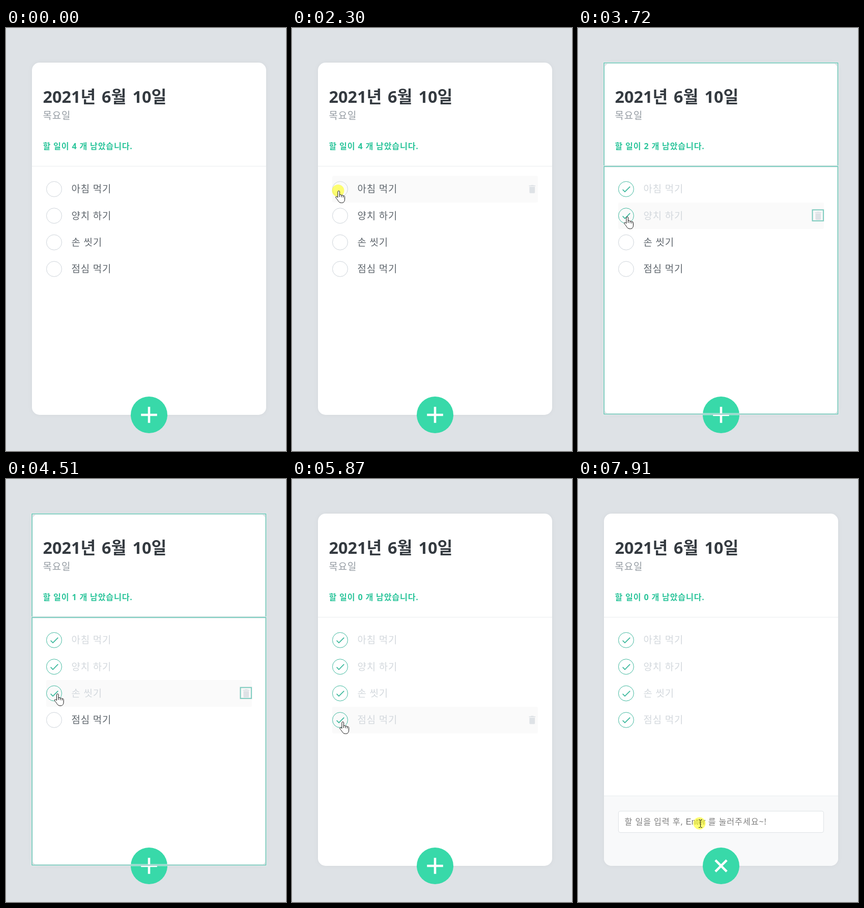
Recreate the animation shown at these times as an HTML page. Size 550 by 831 pixels, loop 8 s.

```html
<!DOCTYPE html>
<html lang="ko">
<head>
<meta charset="utf-8">
<title>할 일 목록</title>
<style>
  html, body { margin: 0; width: 100%; height: 100%; overflow: hidden; background: #dee2e6; }
  svg { display: block; width: 550px; height: 831px; }
  text { font-family: "Noto Sans", "Noto Sans CJK KR", sans-serif; letter-spacing: .047em; white-space: pre; }
  .card { fill: #fff; filter: drop-shadow(0 0 4px rgba(0, 0, 0, .04)); }
  .date { font-size: 32.4px; font-weight: 700; letter-spacing: 0; fill: #343a40; }
  .day { font-size: 18.9px; font-weight: 300; fill: #949ba2; }
  .left { font-size: 16.2px; font-weight: 700; fill: #2cc59b; }
  .line { stroke: #e9ecef; }
  .item text { font-size: 18.9px; font-weight: 300; fill: #5f666d; }
  .item .row { fill: #fafafa; visibility: hidden; }
  .item .bin { fill: #dee2e6; visibility: hidden; }
  .item.hover .row, .item.hover .bin { visibility: visible; }
  .item circle { fill: none; stroke: #ced4da; }
  .item .tick { fill: #3db99d; visibility: hidden; }
  .item.done text { fill: #d3d8dd; }
  .item.done circle { stroke: #40b99f; }
  .item.done .tick { visibility: visible; }
  .hint { font-size: 16.2px; font-weight: 300; letter-spacing: .055em; fill: #808080; }
  .hint .latin { font-family: "Liberation Sans", sans-serif; letter-spacing: 0; fill: #757575; }
  .pointer path { fill: #fff; stroke: #111; stroke-linejoin: round; }
  .pointer .beam { fill: none; }
  .outline rect { fill: none; }
  .outline .halo { stroke: #f0f0f0; stroke-width: 3.6; }
  .outline .edge { stroke: #6fc9bb; stroke-width: 1.7; }
</style>
</head>
<body>
<svg viewBox="0 0 550 831">
  <rect width="550" height="831" fill="#dee2e6"/>
  <rect class="card" x="51" y="68" width="460" height="692" rx="15"/>
  <text class="date" y="146.5"><tspan x="72.5">2021년</tspan><tspan x="188">6월</tspan><tspan x="248.5">10일</tspan></text>
  <text class="day" x="72.5" y="179">목요일</text>
  <text class="left" id="left" x="72.5" y="238"></text>
  <path class="line" d="M51 271.5H511"/>
  <g id="items"></g>
  <g id="form">
    <path fill="#f8f9fa" d="M51 622H511V745a15 15 0 0 1-15 15H66a15 15 0 0 1-15-15z"/>
    <path class="line" d="M51 622.5H511"/>
    <rect x="79.5" y="652.5" width="403" height="42" rx="3.5" fill="#fff" stroke="#dee2e6"/>
    <text class="hint" x="91.5" y="679">할 일을 입력 후, <tspan class="latin">Enter</tspan> 를 눌러주세요~!</text>
  </g>
  <circle id="button" cx="281" cy="760" r="36"/>
  <path id="plus" fill="#fff" d="M19 13h-6v6h-2v-6H5v-2h6V5h2v6h6v2z"/>
  <g class="outline" id="outline"></g>
  <circle id="press" r="12" fill="#ff0" fill-opacity=".55"/>
  <g class="pointer" id="pointer">
    <path id="arrow" d="M.5 .5V16.5L4 13.2 6.8 19.5 9.2 18.4 6.5 12.3H11.5z"/>
    <g id="hand">
      <path d="M-2 13V1.8a1.8 1.8 0 0 1 3.6 0V8c.5-1 3.3-.9 3.7.8.6-.9 3-.7 3.4 1 .7-.7 2.9-.3 2.9 1.6v4.6c0 5-2.2 7.5-6.1 7.5-4.3 0-5.7-2-7.5-5-1.6-2.4-3.4-3.8-4-5.6-.6-1.8 1.7-2.5 2.8-1z"/>
      <path fill="none" d="M1.6 7.5V12M5.3 8.8V12.5M8.7 10V13"/>
    </g>
    <path id="beam" class="beam" d="M-3 -7.5H-.5L.5 -6.5 1.5 -7.5H4M.5 -6.5V6.5M-3 7.5H-.5L.5 6.5 1.5 7.5H4"/>
  </g>
</svg>
<script>
const LOOP = 8000, OUTLINE_TIME = 280, OPEN = 6980;
const $ = id => document.getElementById(id);
const labels = ["아침 먹기", "양치 하기", "손 씻기", "점심 먹기"];
const rowY = i => 316.5 + i * 52.3;

// Mouse button held: [down, up]
const presses = [[2210, 2370], [3450, 3510], [4430, 4510], [5510, 5590], [6900, OPEN], [7910, LOOP]];

// Pointer moves: [first step, last step, steps, x, y]
const start = [-12, 660];
const moves = [
  [610, 1210, 9, 86, 250], [1280, 1280, 1, 88, 278], [1360, 1360, 1, 91, 294],
  [1430, 1780, 6, 92, 320], [2860, 2860, 1, 92, 334], [2950, 2950, 1, 93, 348],
  [3020, 3160, 3, 97, 371], [3800, 4160, 5, 101.5, 422], [4860, 5160, 5, 100, 477],
  [6030, 6530, 8, 274, 751], [7240, 7680, 6, 234, 688], [7770, 7770, 1, 240, 677]
];

$("items").innerHTML = labels.map((label, i) => {
  const y = rowY(i);
  return `<g class="item">
    <rect class="row" x="79" y="${y - 26}" width="404" height="52.3" rx="3"/>
    <circle cx="94.5" cy="${y}" r="15"/>
    <path class="tick" transform="translate(84 ${y - 10.5}) scale(.9)" d="M9 16.2L4.8 12l-1.4 1.4L9 19 21 7l-1.4-1.4L9 16.2z"/>
    <text x="128.5" y="${y + 6.7}">${label}</text>
    <path class="bin" transform="translate(461 ${y - 10.8}) scale(.9)" d="M6 19c0 1.1.9 2 2 2h8c1.1 0 2-.9 2-2V7H6v12zM19 4h-3.5l-1-1h-5l-1 1H5v2h14V4z"/>
  </g>`;
}).join("");
const items = [...document.querySelectorAll(".item")];

const show = (el, on) => { el.style.visibility = on ? "visible" : "hidden"; };
const clamp = v => Math.min(1, Math.max(0, v));
const ease = p => p * p * (3 - 2 * p);

function pointerAt(t) {
  let [x, y] = start;
  for (const [t0, t1, n, toX, toY] of moves) {
    if (t < t0) break;
    const step = t >= t1 ? n : Math.floor((t - t0) / (t1 - t0) * (n - 1)) + 1;
    const p = ease(step / n);
    x += (toX - x) * p;
    y += (toY - y) * p;
  }
  return [x, y];
}

function box(x0, y0, x1, y1) {
  const at = `x="${x0}" y="${y0}" width="${x1 - x0}" height="${y1 - y0}"`;
  return `<rect class="halo" ${at}/><rect class="edge" ${at}/>`;
}

function outlines(t) {
  const i = presses.slice(0, 5).findIndex(([, up]) => t >= up && t < up + OUTLINE_TIME);
  if (i < 0) return "";
  if (i === 4) return box(51, 622.5, 510.5, 759);
  const y = rowY(i);
  return box(51, 68.5, 510.5, 271) + box(51, 272, 510.5, 758.5) + box(460.5, y - 11.5, 482, y + 10);
}

let lastOutline = "";

function draw(t) {
  const [x, y] = pointerAt(t);
  const open = t >= OPEN;
  const onButton = Math.hypot(x - 281, y - 760) < 36;
  const onInput = open && x > 79 && x < 483 && y > 652 && y < 695;
  let left = labels.length, onCheck = false;

  items.forEach((item, i) => {
    const done = t >= presses[i][1];
    if (done) left--;
    item.classList.toggle("done", done);
    item.classList.toggle("hover", x > 79 && x < 483 && Math.abs(y - rowY(i)) < 26.15);
    onCheck = onCheck || Math.hypot(x - 94.5, y - rowY(i)) < 15.5;
  });
  $("left").textContent = `할 일이 ${left} 개 남았습니다.`;

  show($("form"), open);
  $("button").setAttribute("fill", onButton ? "#58e2b8" : "#38d9a9");
  const turn = 45 * ease(clamp((t - OPEN) / 125));
  $("plus").setAttribute("transform", `translate(281 760) rotate(${turn}) scale(2.25) translate(-12 -12)`);

  const html = outlines(t);
  if (html !== lastOutline) $("outline").innerHTML = lastOutline = html;

  const hand = onCheck || onButton;
  show($("hand"), hand);
  show($("beam"), onInput);
  show($("arrow"), !hand && !onInput);
  $("pointer").setAttribute("transform", `translate(${x} ${y})`);
  show($("press"), presses.some(([down, up]) => t >= down && t < up));
  $("press").setAttribute("cx", x - 1.5);
  $("press").setAttribute("cy", y - .5);
}

const begin = performance.now();
function tick() {
  draw((performance.now() - begin) % LOOP);
  requestAnimationFrame(tick);
}
tick();
</script>
</body>
</html>
```
